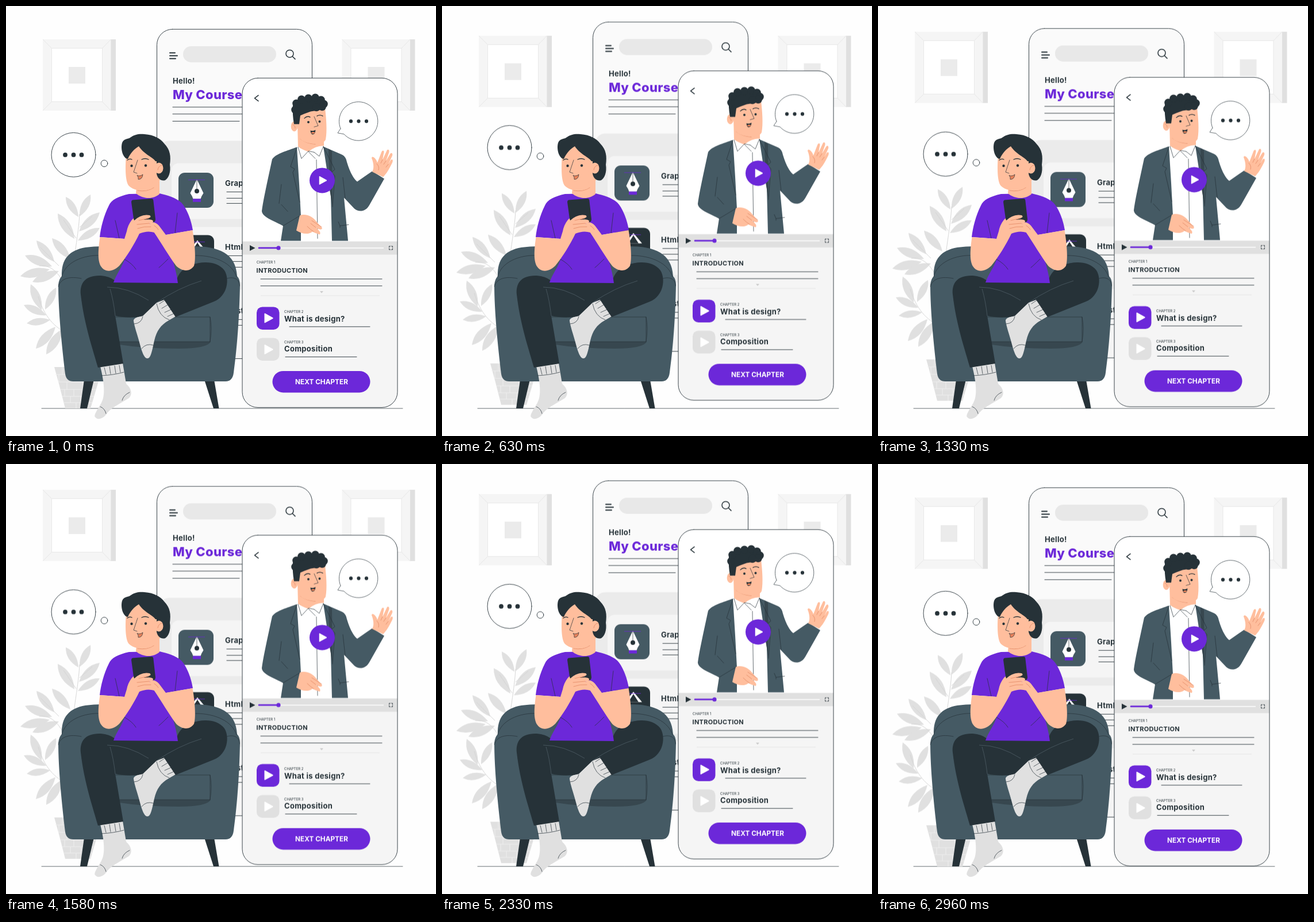
Write an HTML page that moves like this. It is 748x748 px and loops after 3000 ms.

```html
<!DOCTYPE html>
<html lang="en">
<head>
<meta charset="utf-8">
<title>My Courses</title>
<style>
  html, body { margin: 0; width: 100%; height: 100%; overflow: hidden; background: #fefefe; }
  svg { display: block; width: 100vw; height: 100vh; }
  text { font-family: Inter, "Open Sans", sans-serif; fill: #263238; }
  .b { font-weight: 700; font-size: 13px; letter-spacing: .3px; }
  .s { font-size: 6px; }
  .ink { fill: none; stroke: #263238; stroke-width: .9; stroke-linecap: round; stroke-linejoin: round; }
  .thin { stroke-width: .7; }
  .dark { fill: #263238; }
  .suit { fill: #455a64; }
  .skin { fill: #ffbe9d; }
  .pur { fill: #6c28d9; }
  .grey { fill: #e0e0e0; }
  .white { fill: #fff; }
  .crease { fill: none; stroke: #e58f6b; stroke-width: .9; stroke-linecap: round; }
</style>
</head>
<body>
<svg viewBox="0 0 748 748">
  <defs>
    <g id="frame">
      <path fill="#f5f5f5" d="M64 58H183V182H64Z"/>
      <path class="grey" d="M182.500 58H191V182H182.500Z"/>
      <path fill="#fff" stroke="#e4e4e4" stroke-width=".8" d="M79.500 73.500H167.500V166.500H79.500Z"/>
      <path fill="none" stroke="#e4e4e4" stroke-width=".8" d="M64 58L79.500 73.500M182.500 58L167.500 73.500M64 182L79.500 166.500M182.500 182L167.500 166.500"/>
      <path fill="#ebebeb" d="M109 106H138V135H109Z"/>
    </g>
    <path id="play" class="white" d="M-6 -7.500Q-6 -9 -4.500 -8.200L8.500 -1Q10 0 8.500 1L-4.500 8.200Q-6 9 -6 7.500Z"/>
    <clipPath id="screen"><rect x="263" y="41" width="269" height="573" rx="27"/></clipPath>
    <clipPath id="front"><rect x="411" y="126" width="270" height="573" rx="27"/></clipPath>
  </defs>

  <g class="slow">
    <use href="#frame"/>
    <use href="#frame" x="520.500"/>
  </g>
  <path class="ink thin" d="M62 700H690"/>

  <g class="slow">
    <g id="leaves" class="grey"></g>
    <path fill="none" stroke="#d6d6d6" d="M128 362C126 400 118 430 112 500M128 385L150 366M122 404L100 372M58 452C80 450 95 465 108 500M60 420L92 452M56 505C66 540 85 560 108 570"/>
    <path class="grey" d="M84 628H166L160 656L147 700H103L92 657Z"/>
    <path fill="none" stroke="#f0f0f0" stroke-width=".9" d="M86 641H163M91 654H161M95 667H157M98 679H153M101 690H150M98 628V641M92 641V654M106 654V667M102 667V679M118 667V679M112 679V690M130 679V690M122 690V700M134 654V667"/>
  </g>

  <g class="float">
    <rect x="262.500" y="41" width="270" height="573" rx="27" fill="#fafafa"/>
    <g clip-path="url(#screen)">
      <rect x="266" y="235" width="280" height="400" rx="18" fill="#ebebeb"/>
      <g fill="#f5f5f5">
        <rect x="288" y="274" width="235" height="97" rx="12"/>
        <rect x="288" y="385" width="235" height="96" rx="12"/>
        <rect x="288" y="494" width="235" height="140" rx="12"/>
      </g>
    </g>
    <rect class="ink" x="262.500" y="41" width="270" height="573" rx="27"/>
    <path class="ink" style="stroke-width:2" d="M285 82H294M285 87H298M285 92H295"/>
    <rect x="308" y="70.500" width="162" height="28" rx="14" fill="#e8e8e8"/>
    <path class="ink" style="stroke-width:1.500" d="M500 83.500A6.500 6.500 0 1 1 487 83.500A6.500 6.500 0 1 1 500 83.500M498.300 88.300L503 93"/>
    <text class="b" x="290" y="135.500">Hello!</text>
    <text x="290" y="162.500" font-size="22" font-weight="800" letter-spacing=".3" style="fill:#6c28d9">My Courses</text>
    <path class="ink" d="M290 176.500H411M290 188.500H411M290 201H406"/>

    <rect class="suit" x="300" y="290.500" width="61" height="61" rx="11"/>
    <path class="white" d="M332 302L343.500 326Q340 331 338.500 336H325.500Q324 331 320.500 326Z"/>
    <path class="ink thin" d="M332 303V320"/>
    <circle class="dark" cx="332" cy="322.500" r="4"/>
    <path class="pur" d="M325 336H339V341.500H325Z"/>
    <path fill="none" stroke="#6c28d9" stroke-width=".8" d="M317 303H346"/>
    <rect class="dark" x="300" y="399" width="62" height="61" rx="11"/>
    <path class="white" d="M333 408L348 426H318Z"/>
    <path class="dark" d="M333 412L342 426H324Z"/>
    <path fill="none" stroke="#6c28d9" stroke-width=".8" d="M322 411H346"/>
    <text class="b" x="381" y="314">Graphic</text>
    <text class="b" x="381" y="425">Html</text>
    <text class="b" x="381" y="536">Illustration</text>
    <path class="ink" d="M384 324H411M384 335H411M384 344H411M384 435H411M384 445H411M384 455H411M384 546H411M384 556H411"/>

    <rect class="white" x="411" y="126" width="270" height="573" rx="27"/>
    <g clip-path="url(#front)">
      <path fill="#f5f5f5" d="M411 432H681V699H411Z"/>
      <path class="grey" d="M411 410H681V433H411Z"/>
    </g>
    <path class="ink" style="stroke-width:1.500" d="M439 156L432.500 161L439 166"/>

    <!-- instructor -->
    <path class="white" d="M507 246H554L572 409H510Z"/>
    <path class="skin" d="M507 205H553V244Q540 243 526 254Q514 250 508 245Z"/>
    <path class="crease" d="M512 232Q522 240 538 241"/>
    <ellipse class="skin" cx="501.500" cy="210" rx="5.800" ry="8.800"/>
    <path class="crease" d="M499 207Q503 208 503 213"/>
    <path class="skin" d="M505 184L508 214C508 228 511 234 520 237C534 242 552 242 556 233C559 218 557 195 555 178L530 172Z"/>
    <path class="dark" d="M499 172L510 164L530 159L549 165L556 176L549 181L530 184L519 188L512 191L510 206H501Q498 190 499 172Z"/>
    <g id="curls" class="dark"></g>
    <path class="ink" style="stroke-width:1.300" d="M519 196Q524 191 529 194M541 192Q546 189 551 192"/>
    <path class="ink thin" d="M536 193L543 209L536 211"/>
    <g class="dark"><circle cx="526" cy="202.500" r="2"/><circle cx="545.500" cy="201.500" r="2"/></g>
    <path class="dark" d="M529.500 217Q534 219 538.500 216Q538 224 533 224Q530 223 529.500 217Z"/>
    <path fill="#e8825a" d="M530.500 221Q534.500 218.500 537.500 220.500Q535 225 530.500 221Z"/>
    <path class="ink thin" d="M508 246L514 266L526 253L536 255M552 245L545 262L536 255M526 254L538 266M540 268L542 405"/>
    <path class="suit" d="M506 246C490 252 470 257 463 267C456 300 448 335 445 357C445 368 470 376 482 383L478 409H513L513 366L510 310Z"/>
    <path class="suit" d="M552 245L582 258Q591 261 593 272C598 289 605 302 611 306L637 288L658 301L632 347C626 358 614 360 606 353L588 334L595 409H567L565 330Z"/>
    <path fill="#37474f" d="M561 249L567 253L568 350L563 320Z"/>
    <path class="ink thin" d="M506 247L495 280L502 284L499 290L511 342M475 344L479 311M482 383L512 365M479 346L490 358M552 245L572 285L566 290L572 296L568 350M586 299L590 335M578 376L581 383L596 381M581 383V386"/>
    <path class="skin" d="M511 365C521 361 531 366 537 372L550 387Q549 392 539 386Q549 394 546 398Q538 396 533 393C526 399 514 397 505 391Z"/>
    <path class="crease" d="M530 379L539 386M524 384Q530 390 535 393M532 374L549 385"/>
    <path class="skin" d="M637 289C641 282 639 272 636 265C637 260 644 266 646 273L653 255C655 250 659 252 657 257L655 268L662 253C664 248 668 251 666 256L661 270L668 258C671 254 674 258 671 263L665 276L669 269C673 265 674 270 671 275C667 283 663 291 656 298Z"/>
    <path class="crease" d="M655 268L652 274M661 270L657 276M645 275Q650 280 648 286M665 276L661 281"/>
    <circle class="pur" cx="550" cy="304" r="22"/>
    <use href="#play" transform="translate(550 304) scale(.88)"/>

    <path class="white" d="M584 212L577 221L590 224Z"/>
    <circle class="white" cx="613" cy="201" r="33.500"/>
    <path class="ink thin" d="M582 214L577 221.500L588 223.500A33.700 33.700 0 1 0 582 214"/>
    <g class="dark"><circle cx="600" cy="201" r="3.100"/><circle cx="613.500" cy="201" r="3.100"/><circle cx="627" cy="201" r="3.100"/></g>

    <path class="dark" d="M424 416.500L433.500 421.500L424 426.500Z"/>
    <path stroke="#fff" stroke-width="1.500" d="M474 421.500H657"/>
    <path stroke="#6c28d9" stroke-width="2.600" stroke-linecap="round" d="M440 421.500H474"/>
    <circle class="pur" cx="474" cy="421.500" r="3.600"/>
    <path class="ink" d="M666.500 420.500V418.500H668.500M670.500 418.500H672.500V420.500M672.500 422.500V424.500H670.500M668.500 424.500H666.500V422.500"/>

    <text class="s" x="436" y="449">CHAPTER 1</text>
    <text class="b" x="435.500" y="465" style="font-size:11px">INTRODUCTION</text>
    <path class="ink" d="M443 475.500H654M443 487.500H654M493 558.500H633M486 611H610"/>
    <path fill="#ccc" d="M546 496.500H552L549 500Z"/>
    <path stroke="#e6e6e6" d="M443 504.500H650"/>
    <rect class="pur" x="436" y="524" width="39.500" height="39.500" rx="10"/>
    <use href="#play" x="455.500" y="543.500"/>
    <text class="s" x="484" y="535">CHAPTER 2</text>
    <text class="b" x="484" y="550">What is design?</text>
    <rect class="grey" x="436" y="578" width="39.500" height="39.500" rx="10"/>
    <use href="#play" x="455.500" y="598"/>
    <text class="s" x="484" y="588">CHAPTER 3</text>
    <text class="b" x="484" y="602">Composition</text>
    <rect class="pur" x="463.500" y="635.500" width="170" height="37.500" rx="18.700"/>
    <text x="549" y="659" text-anchor="middle" font-size="11.800" font-weight="700" style="fill:#fff">NEXT CHAPTER</text>
    <rect class="ink" x="411" y="126" width="270" height="573" rx="27"/>

    <g class="ink">
      <circle class="white" cx="117.500" cy="259.500" r="38.500"/>
      <circle class="white" cx="171" cy="274.500" r="5.800"/>
    </g>
    <g class="dark"><circle cx="103" cy="259.500" r="3.900"/><circle cx="117.500" cy="259.500" r="3.900"/><circle cx="131.500" cy="259.500" r="3.900"/></g>
  </g>

  <!-- armchair -->
  <path class="dark" d="M136 650H153L141 700H129ZM345 650H362L370.500 700H361Z"/>
  <path class="suit" d="M91 485Q92 475 97 470C96 440 110 425 138 420Q152 418 170 418H325C370 418 400 430 402 470Q407 475 407 485C406 540 402 595 396 638Q394 653 382 653H117Q105 653 103 640C97 590 91 530 91 485Z"/>
  <path fill="#37474f" d="M190 584H356Q350 596 300 596Q240 596 190 588Z"/>
  <path class="ink thin" d="M91 488C95 473 112 470 131 474M97 471C102 446 135 432 166 434M384 474C398 470 406 476 406.500 487M330 434C365 434 394 448 401 471M190 541H355V584H190M355 541Q359 560 355 584"/>

  <!-- learner -->
  <path class="grey" d="M164 627L203 621L209 657C219 666 220 676 214 682C197 693 182 698 173 712C167 719 158 720 155 715C152 711 161 700 166 690C173 678 171 655 164 627Z"/>
  <path class="ink thin" d="M166 643Q187 642 205 637M171 629L174 641M180 627L182 640M189 626L191 639M197 625L199 637M164 697Q172 700 174 709M202 686Q204 677 215 672"/>
  <path class="grey" d="M260 517L274 509L295 540L283 547C269 555 262 565 258 582C254 600 252 613 246 613C240 613 236 600 232 585C228 570 224 560 222 548Q221 542 237 539Z"/>
  <path class="ink thin" d="M262 518Q266 540 284 546M267 518L276 512M271 526L281 520M276 533L287 528M281 540L292 535M223 553Q236 552 238 540M236 596Q244 586 256 590"/>
  <path class="dark" d="M165 469C138 468 128 482 130 502C136 555 152 600 160 629L204 622L190 539C208 543 230 542 238 539L262 516L275 511L295 541L362 514C386 504 389 474 380 460C368 444 342 443 322 451C306 457 300 466 296 478L190 478Q180 470 165 469Z"/>
  <path fill="none" stroke="#53646c" stroke-width=".7" d="M176 489Q212 489 248 512M181 492Q187 512 190 539M262 516Q300 490 340 478"/>
  <path class="pur" d="M214 327C196 331 183 337 179 347C170 365 165 385 163 402L206 405L208 436C202 455 192 466 187 481L299 482C296 455 285 430 279 398L325 390C322 370 313 350 305 342C295 333 280 329 267 326Z"/>
  <path class="ink thin" d="M190 373L197 404M298 360L294 395M205 440Q220 448 226 458M282 440Q270 452 266 455"/>
  <path class="skin" d="M163.500 402C160 425 159 445 166 454C174 465 188 461 197 452C210 436 223 415 232 396L240 368Q228 362 219 372Q212 381 210 392L206 405Z"/>
  <path class="skin" d="M324.500 390C328 410 331 440 327 452C319 464 305 461 296 452C284 436 270 412 257 393L250 377Q259 374 266 382L278 398Z"/>
  <path class="skin" d="M227 312L267 305V327C256 337 238 336 226 326Z"/>
  <path class="crease" d="M229 321Q245 324 257 316"/>
  <path class="skin" d="M209 258C207 285 208 304 213 312C221 322 246 324 256 316C266 309 272 298 276 280L270 240L225 236Z"/>
  <path class="dark" d="M212 266C203 265 199 248 202 238C205 230 212 232 216 229C224 223 232 222 241 223C258 224 269 231 275 239C286 250 287 262 285 276C287 289 283 299 277 303C270 305 264 301 262 292C258 284 264 276 260 270C256 263 240 258 231 244C224 248 216 256 212 266Z"/>
  <ellipse class="skin" cx="266" cy="282" rx="7.500" ry="9.500"/>
  <path class="skin" d="M255 270H262V300L254 310Z"/>
  <path class="crease" d="M264 285Q265 278 271 277"/>
  <path class="ink" style="stroke-width:1.300" d="M211 268Q215 265 219 267M236 267Q242 264 248 267"/>
  <path class="ink thin" d="M229 268L222 289L228 291"/>
  <g class="dark"><circle cx="218.500" cy="278" r="2.200"/><circle cx="243" cy="277.500" r="2.200"/></g>
  <path fill="#e8825a" stroke="#263238" stroke-width=".7" d="M228 294.500Q233 297 238 293Q237 302 230 301.500Q231 298 228 294.500Z"/>
  <path class="dark" d="M220 337.500L253 335Q256 335 256.300 338L260 371Q260 375 257 376L226 374Q222.500 374 222 370L218 341Q218 338 220 337.500Z"/>
  <path class="skin" d="M222 374Q235 361 250 364Q254 367 248 369L239 372Q254 370 256 374Q256 378 249 379Q257 379 259 384L258 394Q246 390 232 396L222 392Z"/>
  <path class="crease" d="M231 373L248 369M228 380L249 378M229 387Q240 383 252 384M258 382Q263 385 265 389"/>
</svg>
<script>
  const fill = (id, html) => document.getElementById(id).innerHTML = html;

  // base x, y, tip x, y
  const leaves = [
    [126, 367, 104, 332], [128, 366, 147, 328], [127, 392, 163, 359], [119, 405, 90, 361],
    [125, 408, 163, 386], [112, 440, 80, 404], [84, 445, 53, 408], [80, 453, 33, 434],
    [76, 458, 25, 470], [92, 461, 46, 480], [62, 529, 43, 484], [68, 528, 87, 490],
    [70, 538, 31, 520], [77, 546, 36, 552], [86, 558, 52, 596], [98, 562, 70, 606]
  ];
  const leaf = ([x, y, tx, ty]) => {
    const dx = tx - x, dy = ty - y, k = .3;
    const side = s => `${x + dx * .55 - dy * k * s} ${y + dy * .55 + dx * k * s}`;
    return `<path d="M${x} ${y}Q${side(1)} ${tx} ${ty}Q${side(-1)} ${x} ${y}"/>`;
  };
  fill("leaves", leaves.map(leaf).join(""));

  const curls = [[503, 181], [505, 170], [514, 163], [526, 161], [538, 160], [548, 164], [553, 171], [550, 176], [540, 177]];
  fill("curls", curls.map(([x, y]) => `<circle cx="${x}" cy="${y}" r="6.800"/>`).join(""));

  // straight up and down, slightly ahead of the loop start
  const bob = (name, duration, low) => {
    const at = y => ({ transform: `translateY(${y}px)` });
    for (const el of document.getElementsByClassName(name))
      el.animate([at(low), at(low - 15), at(low)], { duration, delay: -50, iterations: Infinity });
  };
  bob("float", 1500, .4);
  bob("slow", 3000, .5);
</script>
</body>
</html>
```
